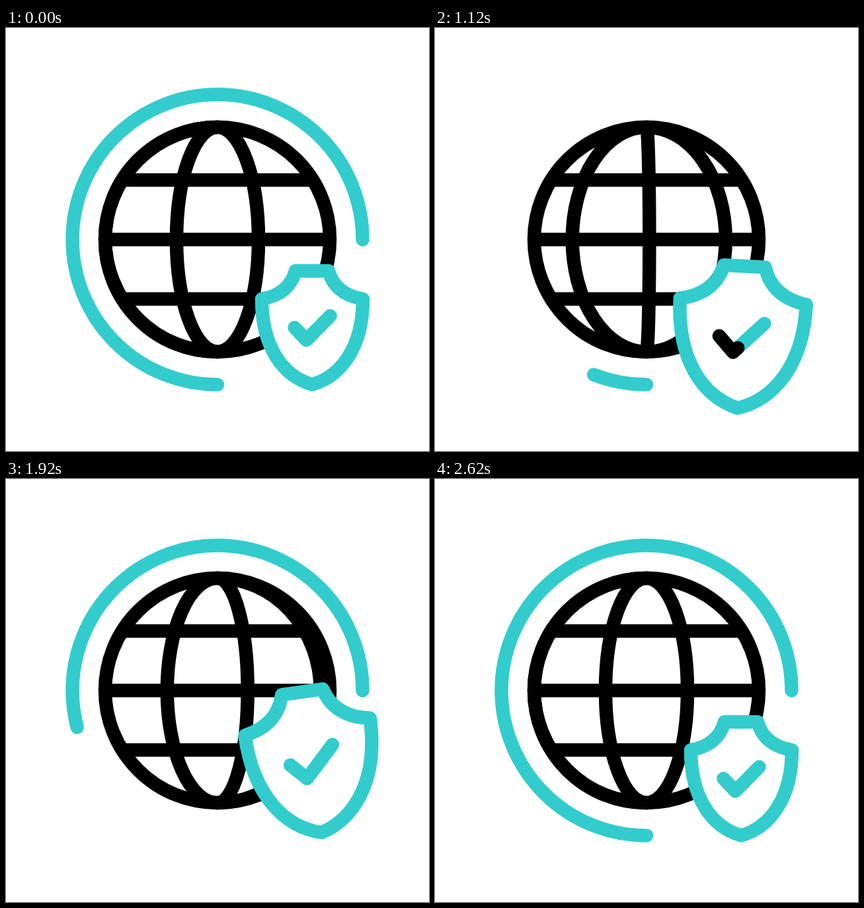
Recreate the animation shown at these times as an HTML page with a canvas. Size 640x640 px, loop 3 s.

```html
<!DOCTYPE html>
<html lang="en">
<head>
<meta charset="utf-8">
<title>Secure globe</title>
<style>
  html, body { margin: 0; width: 100%; height: 100%; overflow: hidden; background: #fff; }
  canvas { display: block; width: 640px; height: 640px; }
</style>
</head>
<body>
<canvas id="stage" width="640" height="640"></canvas>
<script>
const ctx = document.getElementById('stage').getContext('2d');
const TEAL = '#33cccd', BLACK = '#000', LOOP = 3000, MID = 320;

const clamp = v => Math.min(1, Math.max(0, v));
const ramp = (t, from, to) => clamp((t - from) / (to - from));
const ease = (t, from, to) => {
  const p = ramp(t, from, to);
  return p * p * (3 - 2 * p);
};

// Eased value through [time, value] keys
function track(t, keys) {
  let value = keys[0][1];
  for (let i = 1; i < keys.length; i++) {
    const [t0, v0] = keys[i - 1], [t1, v1] = keys[i];
    value += (v1 - v0) * ease(t, t0, t1);
  }
  return value;
}

// Shield and tick, relative to the shield's centre
const shield = new Path2D(`M-25.5-86 H24.5
  C31-62 48.5-48 76.5-43.3 C76.5 32 41.5 74 -.2 86
  C-42.5 74 -76.5 32 -76.5-43.3 C-49-48 -32-62 -25.5-86Z`);
const tick = new Path2D('M-27-.2 L-9 18.7 L27-17.8');
const TICK_LENGTH = Math.hypot(18, 18.9) + Math.hypot(36, 36.5);

function stroke(color, path) {
  ctx.strokeStyle = color;
  path ? ctx.stroke(path) : ctx.stroke();
}

function drawRing(t) {
  const start = ramp(t, 200, 1200), end = ramp(t, 1200, 2200);
  const from = t < 1200 ? start : 0, to = t < 1200 ? 1 : end;
  if (to - from < 1e-4) return;
  const angle = p => -p * Math.PI * 1.5;
  ctx.beginPath();
  ctx.arc(MID, MID, 219.5, angle(from), angle(to), true);
  ctx.lineCap = 'round';
  stroke(TEAL);
}

function drawGlobe(t) {
  ctx.lineCap = 'butt';
  ctx.beginPath();
  ctx.arc(MID, MID, 170, 0, 2 * Math.PI);
  for (const [y, half] of [[-90, 144], [0, 170], [90, 144]]) {
    ctx.moveTo(MID - half, MID + y);
    ctx.lineTo(MID + half, MID + y);
  }
  stroke(BLACK);

  const turn = ramp(t, 200, 2600) * 4 % 1;
  for (const x of [-170 + 108 * turn, -62 + 124 * turn, 62 + 108 * turn]) {
    ctx.beginPath();
    ctx.ellipse(MID, MID, Math.abs(x), 170, 0, -Math.PI / 2, Math.PI / 2, x < 0);
    stroke(BLACK);
  }
}

function drawShield(t) {
  const scale = track(t, [[200, 1], [900, 1.25], [1900, 1.25], [2600, 1]]);
  const y = track(t, [[200, 0], [700, -25], [1300, 25], [1900, -25], [2500, 0]]);
  const angle = track(t, [[200, 0], [800, -12], [1400, 15], [2000, -9], [2600, 0]]);

  // Only the outline is scaled, the line weight stays constant
  const pose = new DOMMatrix().translate(463.5, 453.4 + y).rotate(angle).scale(scale);
  const place = path => {
    const placed = new Path2D();
    placed.addPath(path, pose);
    return placed;
  };
  const body = place(shield), mark = place(tick);

  ctx.lineCap = 'round';
  ctx.fillStyle = '#fff';
  ctx.fill(body);
  stroke(TEAL, body);
  stroke(TEAL, mark);

  const from = ease(t, 1100, 1800), to = ease(t, 800, 1500);
  if (to - from < 1e-4) return;
  const length = TICK_LENGTH * scale;
  ctx.setLineDash([(to - from) * length, 2 * length]);
  ctx.lineDashOffset = -from * length;
  stroke(BLACK, mark);
  ctx.setLineDash([]);
}

function frame() {
  const t = performance.now() % LOOP;
  ctx.fillStyle = '#fff';
  ctx.fillRect(0, 0, 640, 640);
  ctx.lineWidth = 20.5;
  ctx.lineJoin = 'round';
  drawRing(t);
  drawGlobe(t);
  drawShield(t);
  requestAnimationFrame(frame);
}
frame();
</script>
</body>
</html>
```
